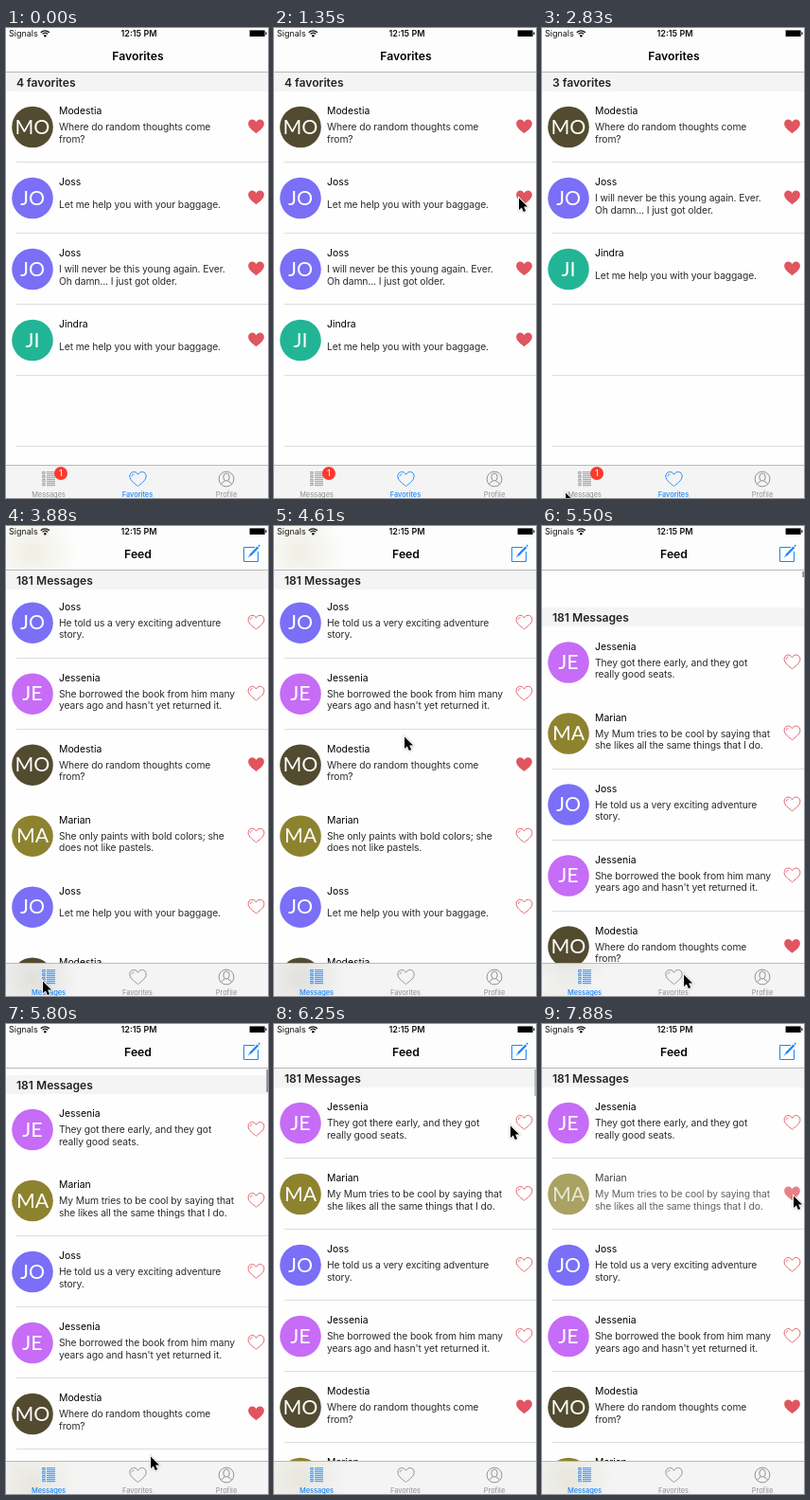
These frames come from a looping animation (277x496 px, 8 s). An HTML page with a canvas:

```html
<!DOCTYPE html>
<html lang="en">
<head>
<meta charset="utf-8">
<title>Favorites and feed</title>
<style>
html, body { margin: 0; width: 100%; height: 100%; overflow: hidden; background: #fff; }
canvas { display: block; width: 277px; height: 496px; }
</style>
</head>
<body>
<canvas id="stage"></canvas>
<script>
const W = 277, H = 496, LOOP = 8000;
const ROW = 75, LIST_TOP = 67, BAR = 46, TABS = 461;
const RED = '#e05560', BLUE = '#1a86fb', GRAY = '#8e8e93';
const canvas = document.getElementById('stage');
const ctx = canvas.getContext('2d');
const ratio = window.devicePixelRatio || 1;
canvas.width = W * ratio;
canvas.height = H * ratio;

const people = {
  MO: { name: 'Modestia', color: '#534b30' },
  JO: { name: 'Joss', color: '#7a6ff6' },
  JI: { name: 'Jindra', color: '#22b595' },
  JE: { name: 'Jessenia', color: '#c66cf7' },
  MA: { name: 'Marian', color: '#8d832f' }
};
const thoughts = ['Where do random thoughts come', 'from?'];
const baggage = ['Let me help you with your baggage.'];
const row = (who, lines, liked = false) => ({ who, lines, liked });
const favorites = [
  row('MO', thoughts, true),
  row('JO', baggage, true),
  row('JO', ['I will never be this young again. Ever.', 'Oh damn... I just got older.'], true),
  row('JI', baggage, true)
];
const feed = [
  row('JE', ['They got there early, and they got', 'really good seats.']),
  row('MA', ['My Mum tries to be cool by saying that', 'she likes all the same things that I do.']),
  row('JO', ['He told us a very exciting adventure', 'story.']),
  row('JE', ['She borrowed the book from him many', "years ago and hasn't yet returned it."]),
  row('MO', thoughts, true),
  row('MA', ['She only paints with bold colors; she', 'does not like pastels.']),
  row('JO', baggage),
  row('MO', thoughts)
];

// Motion is sampled in ticks; every key is [tick, ...values].
const TICK = 148.54, FIRST = 750;
const cursorKeys = [
  [0, 265, 189], [1, 258, 189], [2, 258, 189], [3, 258, 183], [4, 258, 178], [9, 258, 178],
  [10, 232, 206], [12, 110, 380], [13, 52, 460], [14, 24, 489], [16, 29, 485], [17, 35, 481],
  [18, 38, 479], [21, 38, 479], [22, 46, 460], [24, 104, 300], [26, 137, 221], [27, 137, 221],
  [28, 140, 262], [29, 144, 345], [30, 146, 410], [31, 148, 455], [32, 149, 472],
  [34, 152, 455], [35, 160, 440], [36, 205, 270], [37, 249, 106], [39, 254, 104], [43, 265, 180]
];
const scrollKeys = [
  [27, 152.3], [28, 111], [29, 28.3], [30, -5], [31, -28], [32, -39.5], [33, -24], [34, -7], [35, 0]
];
const removeKeys = [[8, 0], [9, 0.4], [10, 0.9], [11, 1]];
const fadeKeys = [[46, 1], [47, 0.88], [48, 0.75]];
const thumbKeys = [[27, 0], [28, 1], [35, 1], [37, 0.6], [39, 0]];

function sample(keys, tick) {
  const i = keys.findIndex(k => k[0] > tick);
  if (i === 0) return keys[0].slice(1);
  if (i < 0) return keys[keys.length - 1].slice(1);
  const a = keys[i - 1], b = keys[i], p = (tick - a[0]) / (b[0] - a[0]);
  return a.slice(1).map((v, j) => v + (b[j + 1] - v) * p);
}

function rect(x, y, w, h, color) {
  ctx.fillStyle = color;
  ctx.fillRect(x, y, w, h);
}

function disc(x, y, r, color) {
  ctx.fillStyle = color;
  ctx.beginPath();
  ctx.arc(x, y, r, 0, Math.PI * 2);
  ctx.fill();
}

function text(str, x, y, { size = 10.3, weight = 400, color = '#111', align = 'left', family = 'Inter', spacing = 0 } = {}) {
  ctx.font = `${weight} ${size}px ${family}, sans-serif`;
  ctx.letterSpacing = spacing + 'px';
  ctx.fillStyle = color;
  ctx.textAlign = align;
  ctx.fillText(str, x, y);
}

function line(color, width, ...points) {
  ctx.strokeStyle = color;
  ctx.lineWidth = width;
  ctx.beginPath();
  points.forEach(([x, y], i) => i ? ctx.lineTo(x, y) : ctx.moveTo(x, y));
  ctx.stroke();
}

function heart(x, y, size, color, filled) {
  ctx.save();
  ctx.translate(x, y);
  ctx.scale(size, size);
  ctx.beginPath();
  ctx.moveTo(0, 7.3);
  ctx.bezierCurveTo(-2.5, 5.2, -8.4, 1.6, -8.4, -2.8);
  ctx.bezierCurveTo(-8.4, -8, -2, -8.9, 0, -4.6);
  ctx.bezierCurveTo(2, -8.9, 8.4, -8, 8.4, -2.8);
  ctx.bezierCurveTo(8.4, 1.6, 2.5, 5.2, 0, 7.3);
  ctx.fillStyle = ctx.strokeStyle = color;
  ctx.lineWidth = 0.9;
  if (filled) ctx.fill();
  else {
    ctx.stroke();
    ctx.beginPath();
    ctx.arc(-3.8, -2.6, 2.5, Math.PI, Math.PI * 1.5);
    ctx.lineWidth = 0.7;
    ctx.stroke();
  }
  ctx.restore();
}

function drawRow({ who, lines, liked }, top, alpha = 1) {
  if (top > H || top < -ROW) return;
  const { name, color } = people[who];
  ctx.globalAlpha = alpha;
  disc(28, top + 37.5, 21.8, color);
  text(who, 28, top + 44.5, { size: 21.3, color: '#fff', align: 'center', family: 'Lato' });
  text(name, 56, top + 24.3, { size: 10.4, color: '#000' });
  const base = top + (lines.length > 1 ? 41 : 47.5);
  lines.forEach((s, i) => text(s, 56, base + i * 12.5, { color: '#2b2b2b', spacing: -0.1 }));
  heart(264.5, top + 36.9, 1, RED, liked);
  ctx.globalAlpha = 1;
}

const separator = y => rect(11, y, W - 11, 1, '#dcdcde');

function sectionHeader(label, y) {
  rect(0, y, W, 20, '#f4f4f5');
  text(label, 11, y + 14.5, { size: 12.1, weight: 600, color: '#222' });
}

function drawFavorites(tick) {
  const [gone] = sample(removeKeys, tick);
  for (let i = 0; i < 5; i++) separator(141 + i * ROW);
  favorites.forEach((item, i) => {
    if (i === 1 && gone === 1) return;
    drawRow(item, LIST_TOP + i * ROW - (i > 1 ? gone * ROW : 0), i === 1 ? 1 - gone : 1);
  });
  sectionHeader(`${gone ? 3 : 4} favorites`, 47);
}

function drawFeed(tick, scroll) {
  const [fade] = sample(fadeKeys, tick);
  const pull = Math.floor(Math.max(0, -scroll));
  feed.forEach((item, i) => {
    const top = LIST_TOP + i * ROW - scroll;
    const pressed = i === 1 && fade < 1;
    drawRow(pressed ? { ...item, liked: true } : item, top, pressed ? fade : 1);
    // Some hairlines drop out while the list is off its resting position.
    const y = Math.round(top + 74);
    if (scroll > 0 ? y < 250 : scroll < 0 ? y > 200 : true) separator(y);
  });
  sectionHeader('181 Messages', 47 + pull);
  const [thumb] = sample(thumbKeys, tick);
  ctx.globalAlpha = thumb;
  rect(275.3, 48 + Math.max(0, scroll) * 0.02, 1.7, Math.max(6, 28 - pull * 0.58), '#8a8a8d');
  ctx.globalAlpha = 1;
}

// Avatars shimmer faintly through the translucent bars.
function glow(scroll, from, to) {
  ctx.save();
  ctx.beginPath();
  ctx.rect(0, from, W, to - from);
  ctx.clip();
  feed.forEach(({ who }, i) => {
    const y = LIST_TOP + 38 + i * ROW - scroll;
    if (y < from - 25 || y > to + 25) return;
    const g = ctx.createRadialGradient(28, y, 4, 28, y, 48);
    g.addColorStop(0, people[who].color + '1c');
    g.addColorStop(1, people[who].color + '00');
    rect(0, from, 80, to - from, g);
  });
  ctx.restore();
}

function wifi(x, y) {
  ctx.strokeStyle = '#111';
  ctx.lineWidth = 1.3;
  [6.2, 3.8].forEach(r => {
    ctx.beginPath();
    ctx.arc(x, y, r, -Math.PI * 0.76, -Math.PI * 0.24);
    ctx.stroke();
  });
  disc(x, y - 0.8, 1.3, '#111');
}

function composeIcon() {
  line(BLUE, 1, [263, 22.5], [251.5, 22.5], [251.5, 37.5], [266.5, 37.5], [266.5, 27]);
  line(BLUE, 2.3, [258, 31], [266.5, 22.2]);
  line(BLUE, 1.6, [267, 21.3], [268.3, 20.2]);
  line(BLUE, 1, [256.3, 33], [258.3, 31]);
}

function drawTop(title) {
  rect(0, 0, W, BAR, '#fdfdfd');
  rect(0, BAR, W, 1, '#b8b8ba');
  text('Signals', 3, 9, { size: 9 });
  wifi(41.3, 9);
  text('12:15 PM', 140.5, 9, { size: 9, weight: 600, align: 'center' });
  rect(257.6, 2.4, 16, 6.6, '#000');
  rect(274.3, 4.3, 1.2, 2.8, '#111');
  text(title, 139.5, 34, { size: 12.2, weight: 600, color: '#000', align: 'center' });
}

function listIcon(color) {
  for (let i = 0; i < 4; i++) {
    const y = 468.5 + i * 4;
    ctx.strokeStyle = color;
    ctx.lineWidth = 0.8;
    ctx.strokeRect(38.8, y, 2.3, 2.3);
    line(color, 0.9, [43, y + 0.2], [52, y + 0.2]);
    line(color, 0.9, [43, y + 2.2], [52, y + 2.2]);
  }
}

function profileIcon(color) {
  ctx.strokeStyle = color;
  ctx.lineWidth = 0.95;
  ctx.beginPath();
  ctx.arc(233, 476, 7.9, 0, Math.PI * 2);
  ctx.stroke();
  ctx.beginPath();
  ctx.ellipse(233, 474, 3.2, 4, 0, 0, Math.PI * 2);
  ctx.stroke();
  line(color, 0.95, [227.4, 481.5], [228.8, 479.6], [231.5, 478]);
  line(color, 0.95, [238.6, 481.5], [237.2, 479.6], [234.5, 478]);
}

function drawTabs(onFeed) {
  const colors = onFeed ? [BLUE, GRAY, GRAY] : [GRAY, BLUE, GRAY];
  listIcon(colors[0]);
  heart(139.5, 476, 1.03, colors[1], false);
  profileIcon(colors[2]);
  ['Messages', 'Favorites', 'Profile'].forEach((label, i) =>
    text(label, 45 + i * 94, 495, { size: 7.4, weight: colors[i] === BLUE ? 500 : 400, color: colors[i], align: 'center' }));
  if (!onFeed) {
    disc(58, 470, 7, '#fb3a2d');
    text('1', 58, 473.4, { size: 9.5, color: '#fff', align: 'center' });
  }
}

function drawCursor(x, y) {
  ctx.save();
  ctx.translate(x + 1, y + 1.4);
  ctx.scale(0.87, 0.87);
  ctx.beginPath();
  [[0, 0], [0, 14.5], [3.3, 11.5], [5.6, 16.8], [8.2, 15.7], [5.9, 10.6], [10.4, 10.5]]
    .forEach(([px, py]) => ctx.lineTo(px, py));
  ctx.closePath();
  ctx.lineWidth = 2.2;
  ctx.strokeStyle = '#fff';
  ctx.shadowColor = 'rgba(0, 0, 0, 0.4)';
  ctx.shadowBlur = 1.5 * ratio;
  ctx.stroke();
  ctx.shadowColor = 'transparent';
  ctx.fillStyle = '#000';
  ctx.fill();
  ctx.restore();
}

function draw(time) {
  // A small lead absorbs uneven frame lengths.
  const tick = time < FIRST ? -1 : Math.floor((time - FIRST + 10) / TICK);
  const onFeed = tick >= 21;
  const [scroll] = sample(scrollKeys, tick);
  ctx.setTransform(ratio, 0, 0, ratio, 0, 0);
  rect(0, 0, W, H, '#fefefe');
  if (onFeed) drawFeed(tick, scroll);
  else drawFavorites(tick);
  drawTop(onFeed ? 'Feed' : 'Favorites');
  rect(0, TABS, W, H - TABS, '#f4f4f4');
  rect(0, TABS, W, 1, '#b8b8ba');
  if (onFeed) {
    glow(scroll, 0, BAR);
    glow(scroll, TABS + 1, H);
    composeIcon();
  }
  drawTabs(onFeed);
  if (tick >= 0) drawCursor(...sample(cursorKeys, tick));
}

function frame() {
  draw(performance.now() % LOOP);
  requestAnimationFrame(frame);
}
frame();
</script>
</body>
</html>
```
